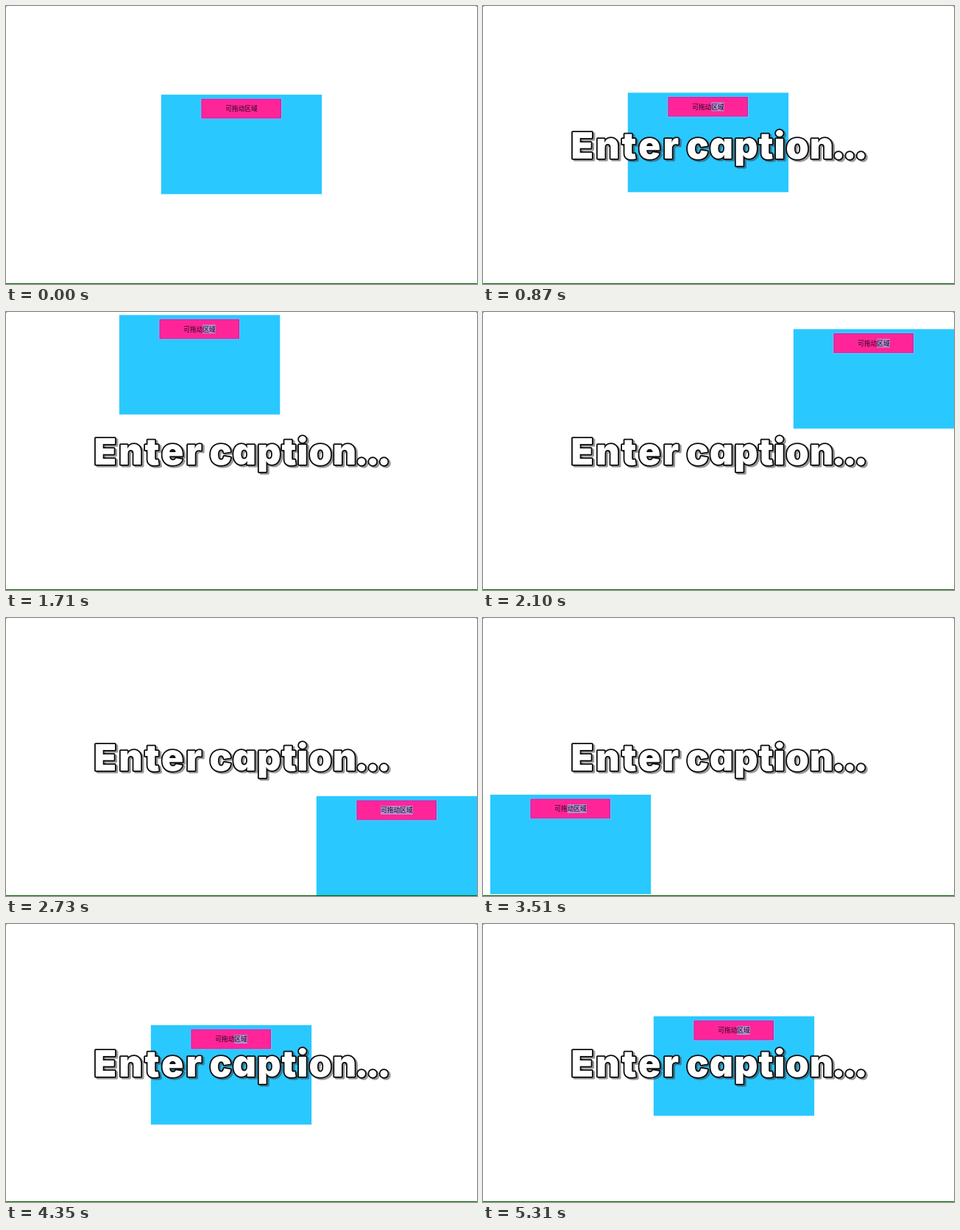
Recreate the animation shown at these times as an HTML page. Size 640 px wide and 379 px high, loop 5.34 s.

```html
<!DOCTYPE html>
<html lang="zh">
<head>
<meta charset="utf-8">
<title>Draggable box</title>
<style>
  html, body { margin: 0; width: 100%; height: 100%; overflow: hidden; background: #fff; }
  svg { display: block; width: 100%; height: 100%; }
  .label { font: 8.7px "Noto Sans CJK SC", "Noto Sans CJK", sans-serif; fill: #1c0a18; }
  .caption {
    font: 900 50px Inter, Lato, sans-serif;
    font-feature-settings: "cv11";
    stroke-width: 3.6;
    stroke-linejoin: round;
    paint-order: stroke;
  }
  .face { fill: #fff; stroke: #0c0c0c; }
  .shadow { fill: #3a3232; stroke: #3a3232; opacity: .5; }
</style>
</head>
<body>
<svg viewBox="0 0 640 379" preserveAspectRatio="none">
  <rect width="640" height="379" fill="#555"/>
  <rect width="640" height="381" rx="2" fill="#fff"/>
  <g id="box">
    <rect width="218" height="135.3" fill="#29c8ff" stroke="#29c8ff" stroke-opacity=".35"/>
    <rect x="53.5" y="4.9" width="110.3" height="28.3" fill="#b9a5ee"/>
    <rect x="54.4" y="5.5" width="108.6" height="26.9" fill="#a136b4"/>
    <rect x="55.6" y="6.7" width="106.2" height="24.7" fill="#ff2599"/>
    <rect id="mark" y="13" height="12" fill="#b48fd0"/>
    <text class="label" x="87.25" y="22.3">可拖动区域</text>
  </g>
  <g id="caption"></g>
  <rect y="378" width="640" height="1" fill="#006400"/>
</svg>
<script>
const LOOP = 5340, STEP = 30, GRAB = 600;
const FLOOR = 243;
const CHAR = 8.7, TEXT_X = 87.25, CHARS = 5;

// Turning points of the drag: time, left, top
const path = [
  [GRAB, 211, 121], [1080, 170, 113], [1290, 0, 48], [1440, 0, 0],
  [2100, 422, 23.5], [2580, 422, FLOOR], [3030, 422, FLOOR],
  [3510, 10, 241], [3570, 0, 178], [3780, 40, 47], [4125, 290, 77],
  [4350, 197, 138], [4470, 86, 141], [4770, 276, 140], [5100, 232, 126]
];

const $ = id => document.getElementById(id);
const box = $("box"), mark = $("mark"), caption = $("caption");

const word = (text, x, gap) => `<tspan x="${x}" letter-spacing="${gap}">${text}</tspan>`;
const dots = [0, 1, 2].map(i => word(".", 473.8 + 15.2 * i, 0)).join("");
const words = word("Enter", 119.5, 3) + word("caption", 276.5, 1.1) + dots;
const line = (kind, shift) =>
  `<text class="caption ${kind}" y="207.5" transform="translate(${shift} ${shift})">${words}</text>`;
caption.innerHTML = line("shadow", 2.5) + line("face", 0);

const slope = (i, k) =>
  (path[i + 1][k] - path[i][k]) / (path[i + 1][0] - path[i][0]);

// Monotone tangent, so the curve never overshoots its points
function tangent(i, k) {
  if (i === 0 || i === path.length - 1) return 0;
  const a = slope(i - 1, k), b = slope(i, k);
  return a * b > 0 ? 2 * a * b / (a + b) : 0;
}

function along(time, k) {
  const t = Math.min(Math.max(time, GRAB), path.at(-1)[0]);
  const j = Math.max(1, path.findIndex(p => t <= p[0])), i = j - 1;
  const p = path[i], q = path[j], d = q[0] - p[0], u = (t - p[0]) / d, v = 1 - u;
  return v * v * (1 + 2 * u) * p[k] + u * u * (3 - 2 * u) * q[k] +
    d * u * v * (v * tangent(i, k) - u * tangent(j, k));
}

// The selection grows as the pointer pulls past the floor or the left wall
function firstSelected(t, x, y) {
  if (t < GRAB) return CHARS;
  if (y >= FLOOR) return 0;
  return Math.min(3, 1 + Math.ceil(x / 10));
}

function draw(now) {
  const t = Math.floor((now % LOOP) / STEP) * STEP;
  const x = along(t, 1), y = along(t, 2), first = firstSelected(t, x, y);
  box.setAttribute("transform", `translate(${x} ${y})`);
  mark.setAttribute("x", TEXT_X + first * CHAR);
  mark.setAttribute("width", (CHARS - first) * CHAR);
  caption.style.display = t < STEP ? "none" : "";
}

let start;
function tick(now) {
  start ??= now;
  draw(now - start);
  requestAnimationFrame(tick);
}
draw(0);
requestAnimationFrame(tick);
</script>
</body>
</html>
```
